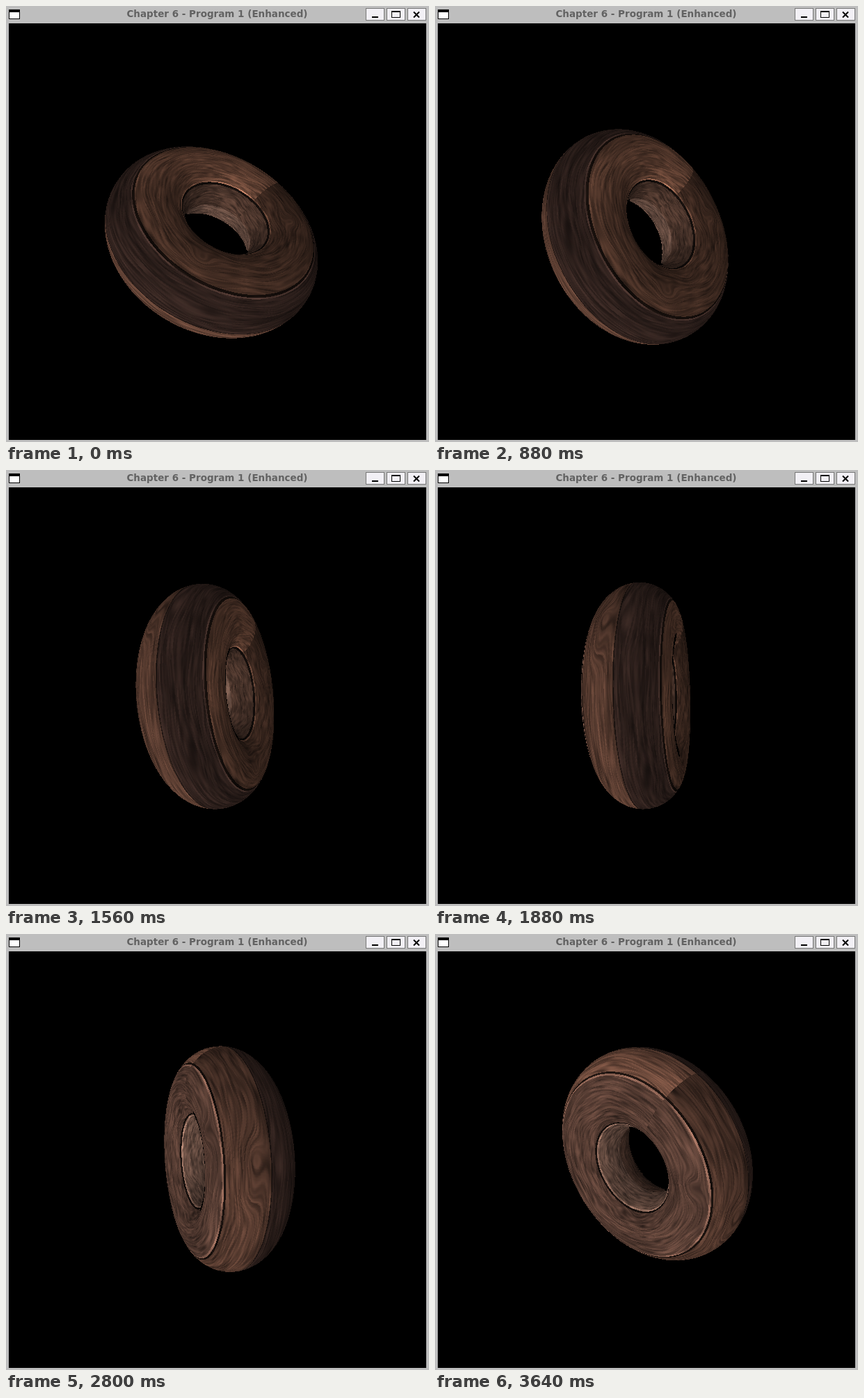
An HTML page with a canvas that plays this animation: 608 by 628 pixels, repeating every 3680 ms.

```html
<!DOCTYPE html>
<html lang="en">
<head>
<meta charset="utf-8">
<title>Wooden torus</title>
<style>
  html, body { margin: 0; width: 100%; height: 100%; overflow: hidden; background: #bebebe; }
  svg, canvas { position: absolute; display: block; }
  svg { left: 0; top: 0; }
  canvas { left: 134px; top: 155px; }
</style>
</head>
<body>
<svg width="608" height="628" shape-rendering="crispEdges">
  <rect width="608" height="628" fill="#bebebe"/>
  <rect x="4" y="25" width="600" height="600"/>
  <rect x="4" y="5" width="16" height="14"/>
  <rect x="5" y="9" width="14" height="9" fill="#fff"/>
  <text x="303.5" y="16" text-anchor="middle" fill="#626262"
    font-family="DejaVu Sans, sans-serif" font-weight="bold" font-size="13.5">Chapter 6 - Program 1 (Enhanced)</text>
  <g fill="#f2f0f5" stroke="#777">
    <rect x="517.5" y="3.5" width="26" height="17"/>
    <rect x="547.5" y="3.5" width="26" height="17"/>
    <rect x="577.5" y="3.5" width="26" height="17"/>
  </g>
  <rect x="526" y="15" width="9" height="2"/>
  <path d="M554 7h13v10h-13zM555 9v7h11v-7z" fill-rule="evenodd"/>
  <path d="M586 8.500l8 8m0-8l-8 8" stroke="#000" stroke-width="2" shape-rendering="auto"/>
</svg>
<canvas id="view" width="340" height="340"></canvas>
<script>
const SIZE = 340, FOCAL = 300 / Math.tan(Math.PI / 6), EYE = 5, TUBE = 0.5;
const LOOP = 3680, STEP = 40, TAU = 2 * Math.PI, DEG = Math.PI / 180;
const TEX_W = 1024, TEX_H = 512;
const LIGHT = [-0.42, -0.37, 0.83];

// Planks around the tube: start angle, colour, brightness drift along the ring
const PLANKS = [
  [-180, [92, 69, 59], 0], [-138, [81, 57, 48], 0], [-58, [90, 61, 49], -0.25],
  [0, [47, 33, 29], 0], [58, [82, 55, 43], 0.3], [138, [72, 51, 42], 0]
];
// Knots: ring angle, tube angle
const KNOTS = [[68, -22], [82, -26], [50, -82], [318, 98], [200, 85]];

const lattice = Float32Array.from({ length: 4096 }, (_, i) => {
  const s = Math.sin(i * 12.9898 + 4.1) * 43758.5453;
  return s - Math.floor(s);
});
const cell = (x, y) => lattice[(x * 1619 + y * 31337) & 4095];
const smooth = f => f * f * (3 - 2 * f);

function noise(x, y) {
  const ix = Math.floor(x), iy = Math.floor(y), fx = smooth(x - ix), fy = smooth(y - iy);
  const top = cell(ix, iy) + (cell(ix + 1, iy) - cell(ix, iy)) * fx;
  const low = cell(ix, iy + 1) + (cell(ix + 1, iy + 1) - cell(ix, iy + 1)) * fx;
  return top + (low - top) * fy;
}

function groove(deg) {
  let k = 1;
  for (const [start] of PLANKS) {
    const d = deg - start;
    if (start === -180) continue;
    if (start === 0) { if (Math.abs(d) < 1) k *= 0.5; }
    else if (d >= 0 && d < 3) k *= 0.3;
    else if (d < 0 && d > -2.6) k *= 1.6;
  }
  return k;
}

function makeWood() {
  const wood = new Uint8ClampedArray(TEX_W * TEX_H * 3);
  for (let row = 0, i = 0; row < TEX_H; row++) {
    const deg = (row + 0.5) / TEX_H * 360 - 180, v = deg * DEG, edge = groove(deg);
    const index = PLANKS.findLastIndex(p => deg >= p[0]);
    const [, colour, drift] = PLANKS[index], seed = index * 37;
    for (let col = 0; col < TEX_W; col++) {
      const u = col / TEX_W * TAU;
      let grain = v + 0.16 * noise(u * 2.5 + seed, v * 3);
      for (const [ku, kv] of KNOTS) {
        const a = (u - ku * DEG) / 0.15, b = (v - kv * DEG) / 0.22, d = a * a + b * b;
        if (d < 9) grain += 0.3 * Math.exp(-d);
      }
      const light = 0.42 + 0.5 * noise(u * 8 + seed, grain * 45 + 300)
        + 0.42 * noise(u * 4 + seed, grain * 20 + 100) + 0.25 * noise(u * 2 + seed, v * 4 + 50);
      const k = light * edge * (1 + drift * (1 - u / Math.PI));
      for (const c of colour) wood[i++] = c * k;
    }
  }
  return wood;
}

const wood = makeWood();
const ctx = document.getElementById("view").getContext("2d");
const image = ctx.createImageData(SIZE, SIZE);

// Spin about the diagonal (1, 1, 0), slower at the start
const spinAt = t => DEG * (t < 560 ? -104 + t * 16.7 / 560 : -87.3 + (t - 560) * 0.0525);

function render(spin) {
  const c = Math.cos(spin) / 2, s = Math.sin(spin) * Math.SQRT1_2;
  const axes = [[0.5 + c, 0.5 - c, -s], [0.5 - c, 0.5 + c, s], [s, -s, 2 * c]];
  const [A, B, C] = axes;
  const [la, lb, lc] = axes.map(e => e[0] * LIGHT[0] + e[1] * LIGHT[1] + e[2] * LIGHT[2]);
  const px = image.data;
  px.fill(0);
  for (let y = 0; y < SIZE; y++) for (let x = 0; x < SIZE; x++) {
    const sx = x + 0.5 - SIZE / 2, sy = SIZE / 2 - y - 0.5;
    if (sx * sx + sy * sy > 167 * 167) continue;
    const len = Math.sqrt(sx * sx + sy * sy + FOCAL * FOCAL);
    const dx = sx / len, dy = sy / len, dz = -FOCAL / len;
    const da = A[0] * dx + A[1] * dy + A[2] * dz;
    const db = B[0] * dx + B[1] * dy + B[2] * dz;
    const dc = C[0] * dx + C[1] * dy + C[2] * dz;
    for (let t = 3.4, n = 0; t < 6.7 && n < 50; n++) {
      const a = A[2] * EYE + da * t, b = B[2] * EYE + db * t, e = C[2] * EYE + dc * t;
      const rho = Math.sqrt(b * b + e * e), q = rho - 1;
      const dist = Math.sqrt(q * q + a * a) - TUBE;
      if (dist > 0.002) { t += dist; continue; }
      const u = (Math.atan2(e, b) + TAU) % TAU, v = Math.atan2(a, q) + Math.PI;
      const col = Math.min(TEX_W - 1, u / TAU * TEX_W | 0);
      const row = Math.min(TEX_H - 1, v / TAU * TEX_H | 0);
      const facing = (a * la + q / rho * (b * lb + e * lc)) / TUBE;
      const shade = 0.62 + 0.45 * Math.max(-0.7, facing);
      const from = (row * TEX_W + col) * 3, to = (y * SIZE + x) * 4;
      for (let k = 0; k < 3; k++) px[to + k] = wood[from + k] * shade;
      px[to + 3] = 255;
      break;
    }
  }
  ctx.putImageData(image, 0, 0);
}

let shown = -1;
function tick() {
  const step = Math.floor(performance.now() % LOOP / STEP);
  if (step !== shown) render(spinAt((shown = step) * STEP));
  requestAnimationFrame(tick);
}
tick();
</script>
</body>
</html>
```
